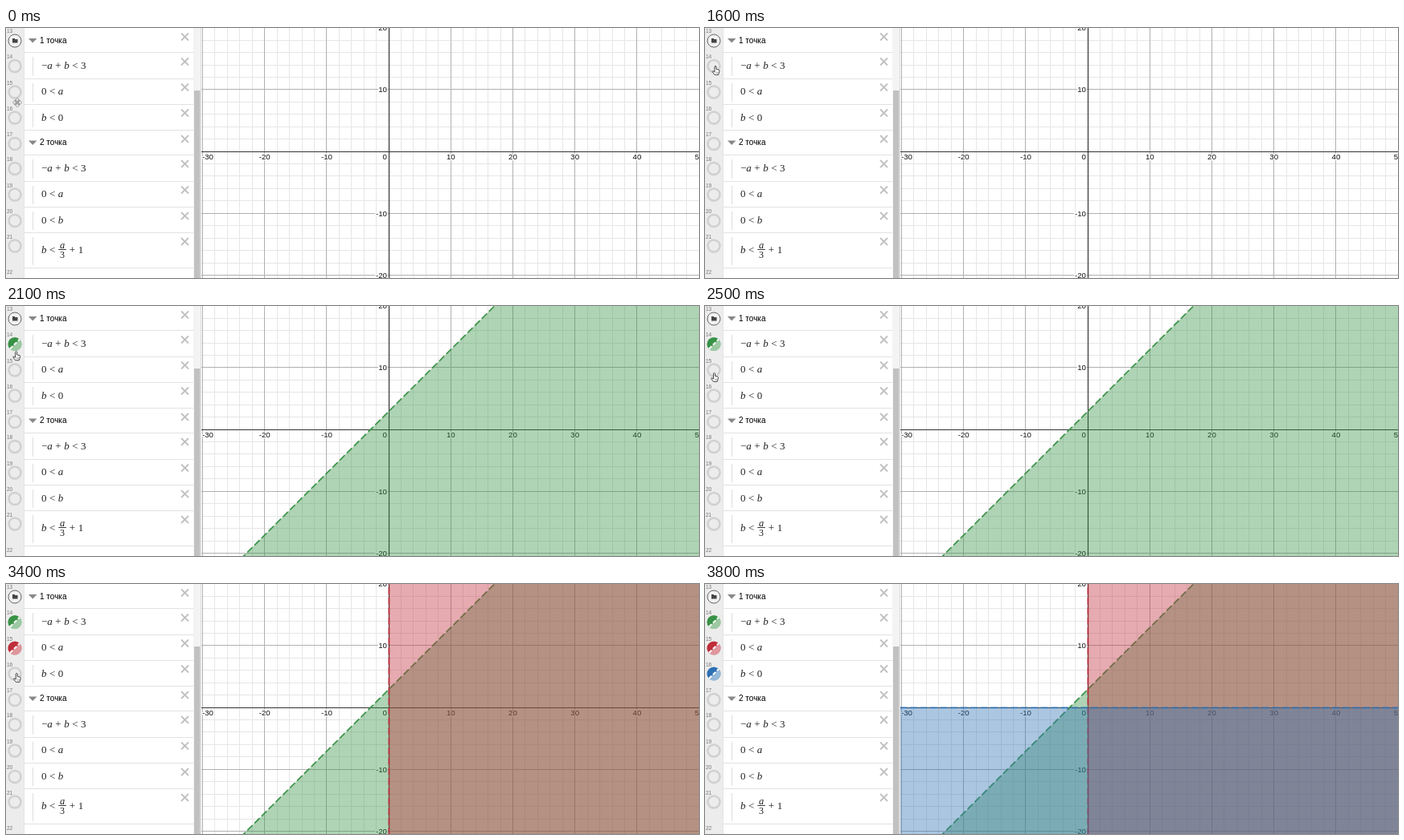
An HTML page with a canvas that plays this animation: 862x312 px, repeating every 4500 ms.

```html
<!DOCTYPE html>
<html lang="ru">
<head>
<meta charset="utf-8">
<style>
html, body { margin: 0; width: 862px; height: 312px; overflow: hidden; background: #fff; }
canvas { display: block; }
</style>
</head>
<body>
<canvas id="stage" width="862" height="312"></canvas>
<script>
const W = 862, H = 312, LOOP = 4500;
const OX = 476.1, OY = 154.1, UNIT = 7.72, LEFT = 243;
const SANS = '"Liberation Sans", Arial, sans-serif';
const SERIF = '"Liberation Serif", "Times New Roman", serif';
const INK = '#222';
const ctx = document.getElementById('stage').getContext('2d');

// Rows of the expression list: top edge, ring centre, cross centre, content
const rows = [
  { n: 13, top: -2, ring: 16, cross: 11, title: '1 точка' },
  { n: 14, top: 30, ring: 47.5, cross: 42, math: '−a + b < 3', base: 51 },
  { n: 15, top: 63, ring: 80, cross: 74, math: '0 < a', base: 83 },
  { n: 16, top: 95, ring: 112, cross: 106, math: 'b < 0', base: 116 },
  { n: 17, top: 127, ring: 144.5, cross: 138.5, title: '2 точка' },
  { n: 18, top: 158, ring: 175.5, cross: 169.5, math: '−a + b < 3', base: 179 },
  { n: 19, top: 191, ring: 208, cross: 202, math: '0 < a', base: 211 },
  { n: 20, top: 223, ring: 240.5, cross: 234.5, math: '0 < b', base: 244 },
  { n: 21, top: 255, ring: 272, cross: 266.5, math: 'b < / + 1', base: 281 },
  { n: 22, top: 299 }
];

// Shaded inequalities, each switched on by a click
const regions = [
  { row: 1, on: 1700, rgb: '56,146,70',
    edge: [[-40, -37], [60, 63]], corners: [[60, -40], [-40, -40]] },
  { row: 2, on: 2600, rgb: '190,45,58',
    edge: [[0, -40], [0, 40]], corners: [[60, 40], [60, -40]] },
  { row: 3, on: 3500, rgb: '45,112,179',
    edge: [[-40, 0], [60, 0]], corners: [[60, -40], [-40, -40]] }
];

// Pointer path: time, x, y
const path = [
  [0, 14, 93], [600, 13, 42], [800, 11, 34], [1200, 11, 34], [1600, 13, 47],
  [1900, 13, 47], [2500, 11.5, 83], [2800, 11.5, 83], [3400, 13.3, 111], [3800, 13.3, 111]
];

const px = a => OX + a * UNIT;
const py = b => OY - b * UNIT;
const crisp = v => Math.floor(v) + .5;

function line(x1, y1, x2, y2, color, width = 1) {
  ctx.strokeStyle = color;
  ctx.lineWidth = width;
  ctx.beginPath();
  ctx.moveTo(x1, y1);
  ctx.lineTo(x2, y2);
  ctx.stroke();
}

function rect(x, y, w, h, color) {
  ctx.fillStyle = color;
  ctx.fillRect(x, y, w, h);
}

function text(s, x, y, font, color, align = 'left') {
  ctx.font = font;
  ctx.fillStyle = color;
  ctx.textAlign = align;
  ctx.fillText(s, x, y);
}

function polygon(points) {
  ctx.beginPath();
  points.forEach(p => ctx.lineTo(...p));
  ctx.closePath();
}

function disc(x, y, r, fill, stroke, width) {
  ctx.beginPath();
  ctx.arc(x, y, r, 0, 7);
  if (fill) { ctx.fillStyle = fill; ctx.fill(); }
  if (stroke) { ctx.strokeStyle = stroke; ctx.lineWidth = width; ctx.stroke(); }
}

function cross(a, b, color, width) {
  const x = crisp(px(a)), y = crisp(py(b));
  line(x, 0, x, H, color, width);
  line(LEFT, y, W, y, color, width);
}

function gridLines(step, color) {
  for (let v = -40; v <= 60; v += step) cross(v, v, color);
}

function label(s, x, y, align) {
  ctx.font = '9.7px ' + SANS;
  ctx.strokeStyle = '#fff';
  ctx.lineWidth = 2.5;
  ctx.textAlign = align;
  ctx.strokeText(s, x, y);
  text(s, x, y, ctx.font, '#111', align);
}

function drawGraph(t) {
  gridLines(2, '#e6e6e6');
  gridLines(10, '#b0b0b0');
  cross(0, 0, '#333', 1.2);
  for (let v = -30; v <= 50; v += 10) {
    if (v) label(v, Math.max(px(v), 251), 164, 'center');
    if (v && Math.abs(v) <= 20) label(v, 474, py(v) + 3.2, 'right');
  }
  label(0, 474, 164, 'right');

  for (const r of regions) {
    if (t < r.on) continue;
    const place = ([a, b]) => [px(a) + .3, py(b) + .3];
    const [p, q] = r.edge.map(place);
    polygon([p, q, ...r.corners.map(place)]);
    ctx.fillStyle = `rgba(${r.rgb},.4)`;
    ctx.fill();
    ctx.setLineDash([9, 3.5]);
    line(...p, ...q, `rgba(${r.rgb},.95)`, 1.8);
    ctx.setLineDash([]);
  }
}

// Spaces become thin operator gaps; "/" stands for the fraction a/3
function drawMath(s, x, y) {
  for (const c of s) {
    if (c === ' ') { x += 3.5; continue; }
    if (c === '/') {
      text('a', x + 5.2, y - 6.5, 'italic 12.5px ' + SERIF, INK, 'center');
      text('3', x + 5.2, y + 6, '12px ' + SERIF, INK, 'center');
      line(x + .5, y - 4.5, x + 10, y - 4.5, INK, .9);
      x += 10.5;
      continue;
    }
    text(c, x, y, (/[ab]/.test(c) ? 'italic ' : '') + '13px ' + SERIF, INK);
    x += ctx.measureText(c).width;
  }
}

function drawFolder(y) {
  disc(11, y, 8, '#f2f2f2', '#666', 1);
  rect(8, y - 3, 3, 1, '#444');
  rect(8, y - 2, 6.5, 4.5, '#444');
}

function drawRegionIcon(y, rgb) {
  disc(11, y, 8.6, `rgb(${rgb})`);
  ctx.beginPath();
  ctx.arc(11, y, 8.6, -Math.PI / 4, Math.PI * 3 / 4);
  ctx.fillStyle = 'rgba(255,255,255,.5)';
  ctx.fill();
  ctx.setLineDash([4.5, 2.5]);
  line(5, y + 6, 17, y - 6, '#fff', 2);
  ctx.setLineDash([]);
}

function drawList(t) {
  rect(0, 0, LEFT, H, '#fff');
  rect(0, 0, 23, H, '#ececec');
  rect(233, 0, 9, H, '#f3f3f3');
  rect(234, 78, 7.5, H - 78, '#c1c1c1');
  line(242.5, 0, 242.5, H, '#ddd');
  line(22.5, 0, 22.5, H, '#e4e4e4');

  rows.forEach((r, i) => {
    text(r.n, 1, r.top + 8, '6.5px ' + SANS, '#777');
    line(23, r.top + .5, 233, r.top + .5, '#e2e2e2');
    if (!r.ring) return;

    const region = regions.find(g => g.row === i && t >= g.on);
    if (i === 0) drawFolder(r.ring);
    else if (region) drawRegionIcon(r.ring, region.rgb);
    else disc(11, r.ring, 7.5, '#ececec', '#d0d0d0', 2.5);

    line(218, r.cross - 4.5, 227, r.cross + 4.5, '#c0c0c0', 1.8);
    line(227, r.cross - 4.5, 218, r.cross + 4.5, '#c0c0c0', 1.8);

    if (r.title) {
      const y = r.cross + 4.5;
      polygon([[28, y - 2.5], [38.5, y - 2.5], [33.2, y + 3]]);
      ctx.fillStyle = '#888';
      ctx.fill();
      text(r.title, 42, y + 3.3, '10px ' + SANS, '#000');
    } else {
      line(33.5, r.top + 6, 33.5, rows[i + 1].top - 3, '#ddd');
      drawMath(r.math, 44, r.base);
    }
  });
}

function pointerAt(t) {
  const i = path.findIndex(k => k[0] > t);
  const [t0, x0, y0] = path[i - 1], [t1, x1, y1] = path[i];
  const u = (t - t0) / (t1 - t0), e = u * u * (3 - 2 * u);
  return [x0 + (x1 - x0) * e, y0 + (y1 - y0) * e];
}

function drawPointer(t) {
  if (t >= 3800) return;
  const [x, y] = pointerAt(t);
  const overRing = rows.some(r => Math.abs(r.ring - y) < 9);
  ctx.save();
  ctx.translate(x, y);
  ctx.lineJoin = 'round';
  ctx.fillStyle = '#fff';
  ctx.strokeStyle = overRing ? '#333' : '#555';
  ctx.lineWidth = overRing ? .9 : .6;
  if (overRing) {
    polygon([[-1, 1], [0, .3], [1, 1], [1, 4.4], [4.4, 5.3], [5, 6.4], [4.3, 9.2],
      [3.6, 11.4], [-1, 11.4], [-3.8, 7.6], [-3.2, 6.6], [-1, 8]]);
    ctx.fill();
    ctx.stroke();
    line(1, 7.8, 1, 9.8, '#555', .6);
    line(2.7, 7.8, 2.7, 9.8, '#555', .6);
  } else {
    for (let k = 0; k < 4; k++) {
      polygon([[0, -5.6], [2.6, -3], [1, -3], [1, -1], [-1, -1], [-1, -3], [-2.6, -3]]);
      ctx.fill();
      ctx.stroke();
      ctx.rotate(Math.PI / 2);
    }
  }
  ctx.restore();
}

function frame(now) {
  const t = Math.floor(now % LOOP / 100) * 100;
  rect(0, 0, W, H, '#fff');
  drawGraph(t);
  drawList(t);
  drawPointer(t);
  requestAnimationFrame(frame);
}
requestAnimationFrame(frame);
</script>
</body>
</html>
```
